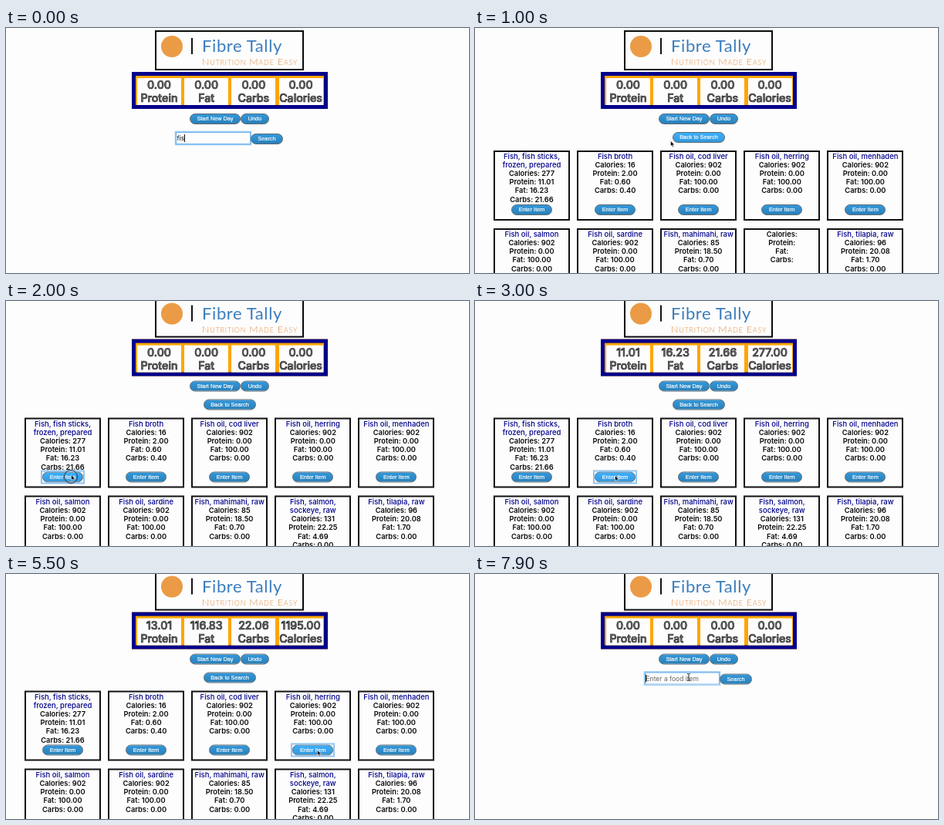
An HTML page that plays this animation: 600x318 px, repeating every 8000 ms.

```html
<!DOCTYPE html>
<html lang="en">
<head>
<meta charset="utf-8">
<title>Nutrition tracker</title>
<style>
  html, body { margin: 0; width: 100%; height: 100%; overflow: hidden; background: #fdfdfd; }
  #stage { position: relative; width: 600px; height: 318px; overflow: hidden; }
  #stage div, #stage svg { position: absolute; box-sizing: border-box; white-space: nowrap; }
  #page { left: 0; top: 0; width: 600px; height: 400px; }
  .logo { border: 2.5px solid #0a0a0a; }
  .mark { border-radius: 50%; background: #eb9b45; }
  .bar { background: #111; }
  .brand { font: 22px/26px Lato, sans-serif; letter-spacing: .6px; color: #3b7dbd; }
  .slogan { font: 300 12.5px/14px Lato, sans-serif; font-variant: small-caps; letter-spacing: .75px; color: #e2893a; }
  .totals { background: orange; border: 5px solid #00008b; }
  .total { background: #fdfdfd; display: flex; justify-content: center; text-align: center;
    font: 500 14.2px/17.5px Inter, sans-serif; color: #777; -webkit-text-stroke: .7px #1c1c1c; }
  .btn { border: 1px solid #5d6a74; border-radius: 8px; text-align: center; color: #fff;
    font: 7.3px/12px "Liberation Sans", Arial, sans-serif; -webkit-text-stroke: .2px #fff;
    background: linear-gradient(#3498db, #2980b9); }
  .btn.hover { background: linear-gradient(#3cb0fd, #3498db); }
  .btn.focus::after { content: ""; position: absolute; inset: -3px; border: 2px solid #92c6f3; }
  .field { border: 1px solid #e6e6e6; padding-left: 1px; font: 8.5px/14px Inter, sans-serif; color: #000; }
  .field.empty { color: #666; }
  .field.focus { border-color: #6fb2ee; box-shadow: 0 0 0 1.3px #9accf6; }
  .caret { background: #111; }
  .card { border: 2.5px solid #111; text-align: center; display: flex; justify-content: center;
    font: 600 9.3px/11.2px Inter, sans-serif; color: #0a0a0a; }
  .card b { font-weight: 500; font-size: 9.5px; color: #00008b; }
  .ring { width: 18px; height: 18px; border: 1px solid #333; border-radius: 50%; }
</style>
</head>
<body>
<div id="stage"><div id="page"></div></div>
<script>
const LOOP = 8000, DELAY = 250, SCROLL = 7.5;
const stage = document.getElementById('stage'), page = document.getElementById('page');

function box(cls, x, y, w, h, html = '', parent = page) {
  const e = document.createElement('div');
  e.className = cls;
  e.style.cssText = `left:${x}px;top:${y}px;width:${w}px;height:${h}px`;
  e.innerHTML = html;
  e.area = [x, y, w, h];
  return parent.appendChild(e);
}
const show = (e, on) => e.style.display = on ? '' : 'none';

// Header
box('logo', 193, 3, 193, 52);
box('mark', 201, 9.5, 28, 28);
box('bar', 240, 13, 2, 21);
box('brand', 254, 10, 120, 26, 'Fibre Tally');
box('slogan', 254, 36.5, 130, 14, 'Nutrition Made Easy');
box('totals', 162.5, 56.7, 254, 48.8);
const labels = ['Protein', 'Fat', 'Carbs', 'Calories'];
const totals = labels.map((_, i) => box('total', 170 + i * 61.2, 64.5, 57, 35));

// Controls
const reset = box('btn', 238, 111, 66, 14, 'Start New Day');
const undo = box('btn', 304, 111, 37, 14, 'Undo');
const back = box('btn', 256, 135, 68, 14, 'Back to Search');
const field = box('field', 219.5, 135, 97, 16);
const search = box('btn', 317, 136.5, 42, 14, 'Search');
const caret = box('caret', 0, 138, 1, 10);

// Foods: title, calories, protein, fat, carbs
const foods = [
  ['Fish, fish sticks,<br>frozen, prepared', 277, 11.01, 16.23, 21.66],
  ['Fish broth', 16, 2, .6, .4],
  ['Fish oil, cod liver', 902, 0, 100, 0],
  ['Fish oil, herring', 902, 0, 100, 0],
  ['Fish oil, menhaden', 902, 0, 100, 0],
  ['Fish oil, salmon', 902, 0, 100, 0],
  ['Fish oil, sardine', 902, 0, 100, 0],
  ['Fish, mahimahi, raw', 85, 18.5, .7, 0],
  ['Fish, salmon,<br>sockeye, raw', 131, 22.25, 4.69, 0],
  ['Fish, tilapia, raw', 96, 20.08, 1.7, 0]
];
const cards = foods.map(([title, cal, ...grams], i) => {
  const x = 24 + i % 5 * 108.1, y = 158.5 + (i > 4) * 101.2;
  const card = box('card', x, y, 99, 91.5);
  card.full = `<span><b>${title}</b><br>Calories: ${cal}<br>` +
    labels.slice(0, 3).map((l, k) => `${l}: ${grams[k].toFixed(2)}`).join('<br>') + '</span>';
  card.ready = i == 8 ? 1150 : 480 + i * 40;
  card.button = box('btn', x + 23, y + 70.5, 53, 14, 'Enter Item');
  return card;
});
const blank = '<span>Calories:<br>Protein:<br>Fat:<br>Carbs:</span>';
const enter = i => cards[i].button;

// Pointer
const ring = box('ring', 0, 0, 18, 18, '', stage);
const arrow = box('', 0, 0, 8, 10,
  '<svg width="8" height="10" viewBox="0 0 8 10"><path d="M.5.5v7l1.6-1.4 1 2.4 1.3-.6-1-2.2h2.2z" fill="#000" stroke="#fff" stroke-width=".6"/></svg>', stage);
const beam = box('', 0, 0, 6, 10,
  '<svg width="6" height="10"><path d="M1 .5h1.2l.8.8.8-.8H5M3 1.3v7.4M1 9.5h1.2l.8-.8.8.8H5" fill="none" stroke="#222"/></svg>', stage);

const path = [
  [700, 262, 143], [1000, 253, 146], [1200, 240, 155], [1700, 84, 225],
  [2500, 84, 225], [2800, 181, 226], [3500, 181, 226], [3850, 328, 108],
  [4600, 328, 108], [5000, 403, 228], [5760, 403, 228], [5980, 290, 132],
  [6350, 290, 132], [6700, 273, 108], [7100, 273, 108], [7600, 277, 134]
];
const clicks = [
  [1950, enter(0), 0], [2850, enter(1), 1], [3100, enter(1), 1], [3350, enter(1), 1],
  [3900, undo], [4350, undo], [5100, enter(3), 3], [5600, enter(3), 3],
  [6000, back], [6900, reset], [7700, field]
];

const ease = p => p * p * (3 - 2 * p);
const ramp = (t, a, b) => ease(Math.min(1, Math.max(0, (t - a) / (b - a))));

function pointerAt(t) {
  const i = path.findIndex(p => p[0] > t);
  if (i < 1) return path[i ? path.length - 1 : 0].slice(1);
  const [a, x, y] = path[i - 1], [b, u, v] = path[i], p = ramp(t, a, b);
  return [x + (u - x) * p, y + (v - y) * p];
}

function inside(e, x, y) {
  const [l, t, w, h] = e.area;
  return x > l - 3.5 && x < l + w && y > t && y < t + h;
}

function draw(t) {
  const scroll = SCROLL * ramp(t, 1200, 1600);
  page.style.transform = `translateY(${-scroll}px)`;

  let log = [], focus = field, pressed = false;
  for (const [at, target, food] of clicks) {
    if (t >= at) {
      focus = target;
      pressed = t < at + 150;
    }
    if (t < at + DELAY) continue;
    if (food !== undefined) log.push(food);
    if (target == undo) log.pop();
    if (target == reset) log = [];
  }
  totals.forEach((e, i) => {
    const sum = log.reduce((s, f) => s + foods[f][i == 3 ? 1 : i + 2], 0);
    e.innerHTML = `<span>${sum.toFixed(2)}<br>${labels[i]}</span>`;
  });

  const results = t >= 400 && t < 6250;
  show(back, results);
  show(field, !results);
  show(search, !results);
  for (const card of cards) {
    show(card, results);
    show(card.button, results);
    const html = t < card.ready ? blank : card.full;
    if (card.shown != html) card.innerHTML = card.shown = html;
  }

  const typed = t < 100 ? 'fis' : t < 400 ? 'fish' : '';
  field.textContent = typed || 'Enter a food item';
  field.classList.toggle('empty', !typed);
  field.classList.toggle('focus', focus == field);
  show(caret, !results && focus == field && (t < 400 || (t - 7700) % 1000 < 500));
  caret.style.left = (typed ? 231 + (typed.length - 3) * 5 : 221) + 'px';

  const [x, y] = pointerAt(t), moving = t >= 700;
  for (const b of [reset, undo, back, search, ...cards.map(c => c.button)]) {
    b.classList.toggle('hover', moving && inside(b, x, y + scroll));
    b.classList.toggle('focus', focus == b);
  }
  const overField = !results && inside(field, x, y + scroll);
  show(arrow, moving && !overField);
  show(beam, moving && overField);
  show(ring, pressed);
  arrow.style.transform = `translate(${x}px,${y}px)`;
  beam.style.transform = `translate(${x - 3}px,${y - 5}px)`;
  ring.style.transform = `translate(${x - 9}px,${y - 6}px)`;
}

function frame() {
  draw(performance.now() % LOOP);
  requestAnimationFrame(frame);
}
frame();
</script>
</body>
</html>
```
